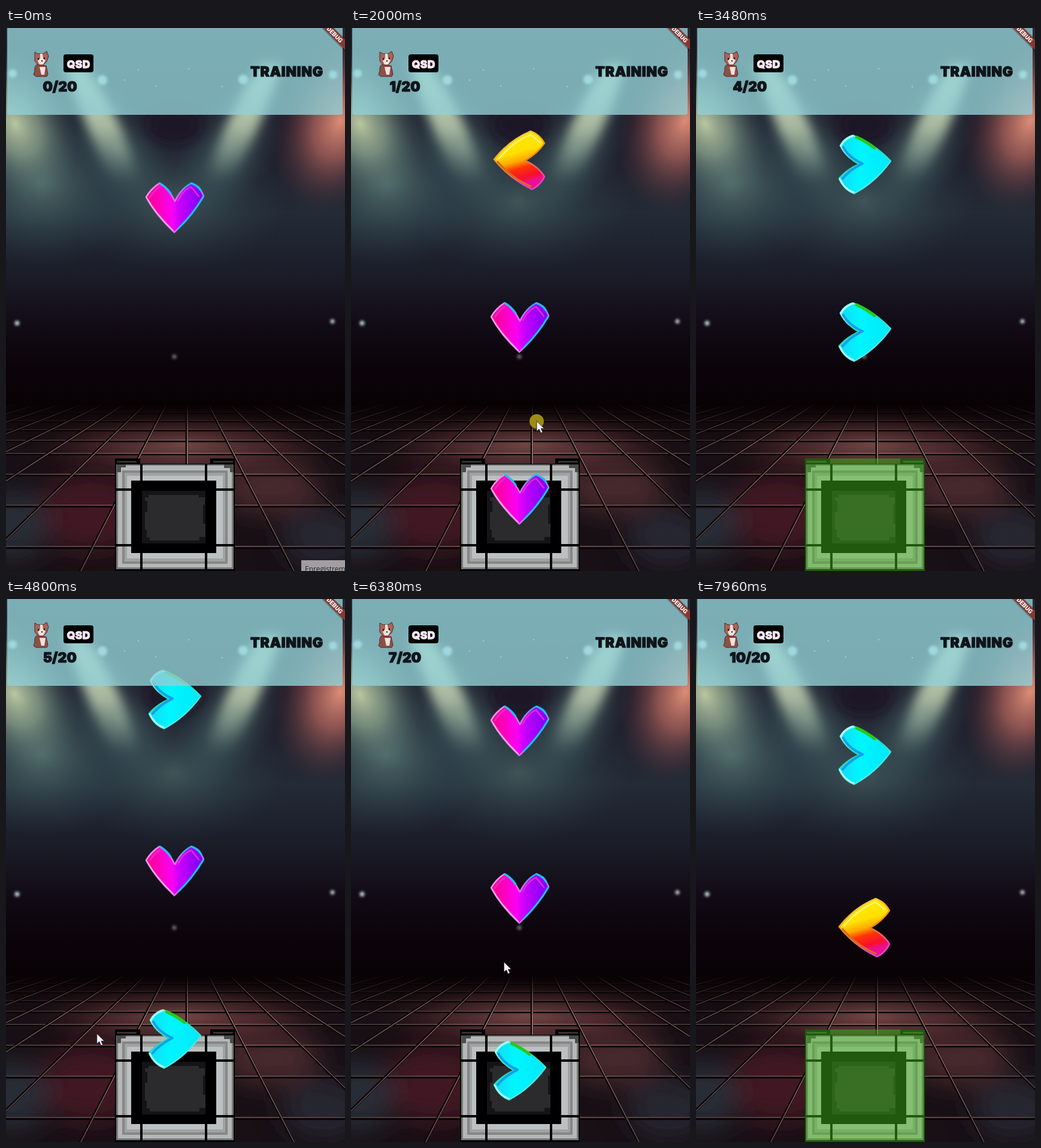
Write an HTML page that moves like this. It is 566 px wide and 907 px high and loops after 8 s.

```html
<!DOCTYPE html>
<html lang="en">
<head>
<meta charset="utf-8">
<title>Arrow training</title>
<style>
html, body { margin: 0; width: 100%; height: 100%; overflow: hidden; background: #080204; }
svg { position: absolute; left: 0; top: 0; width: 566px; height: 907px; }
#room { will-change: transform; }
.title { font: 900 23px Inter, "DejaVu Sans", sans-serif; fill: #10151a; stroke: #10151a; stroke-width: 1.2; stroke-linejoin: round; }
.wide { letter-spacing: .8px; }
.tag { font-size: 18px; fill: #fbe9f5; stroke: #fbe9f5; stroke-width: .8; }
.debug { font: 900 10.2px Roboto, sans-serif; fill: #fff; }
.hint { font: 12px "Open Sans", sans-serif; fill: #22262c; }
</style>
</head>
<body>
<svg id="room" viewBox="0 0 566 907">
  <defs>
    <linearGradient id="wall" x2="0" y2="1">
      <stop offset="0" stop-color="#282936"/><stop offset=".18" stop-color="#1f1b29"/>
      <stop offset=".34" stop-color="#232b36"/><stop offset=".45" stop-color="#1b1d29"/>
      <stop offset=".54" stop-color="#120c17"/><stop offset=".63" stop-color="#0b0309"/>
      <stop offset=".7" stop-color="#080204"/>
    </linearGradient>
    <linearGradient id="depth" x2="0" y2="1">
      <stop offset="0" stop-color="#080204"/><stop offset=".13" stop-color="#080204" stop-opacity=".35"/>
      <stop offset=".25" stop-color="#080204" stop-opacity="0"/>
    </linearGradient>
    <linearGradient id="ray" x2="0" y2="1">
      <stop offset=".2" stop-color="#c6d6b6"/><stop offset=".55" stop-color="#b3c3a8" stop-opacity=".9"/>
      <stop offset="1" stop-color="#7d988c" stop-opacity="0"/>
    </linearGradient>
    <radialGradient id="cream"><stop stop-color="#b9c6a0"/><stop offset=".4" stop-color="#8ba28c" stop-opacity=".75"/><stop offset="1" stop-color="#3d5a60" stop-opacity="0"/></radialGradient>
    <radialGradient id="teal"><stop stop-color="#587774" stop-opacity=".85"/><stop offset="1" stop-color="#2b4550" stop-opacity="0"/></radialGradient>
    <radialGradient id="coral"><stop stop-color="#dc8d76"/><stop offset=".4" stop-color="#a55f59" stop-opacity=".8"/><stop offset="1" stop-color="#4a2b36" stop-opacity="0"/></radialGradient>
    <radialGradient id="sheen"><stop stop-color="#8a5652" stop-opacity=".8"/><stop offset=".5" stop-color="#6a383a" stop-opacity=".55"/><stop offset="1" stop-color="#3a1a20" stop-opacity="0"/></radialGradient>
    <radialGradient id="edge" gradientUnits="userSpaceOnUse" cx="300" cy="695" r="320">
      <stop stop-color="#dba79b"/><stop offset=".5" stop-color="#a3746f"/><stop offset="1" stop-color="#665357"/>
    </radialGradient>
    <filter id="soft" x="-100%" y="-100%" width="300%" height="300%"><feGaussianBlur stdDeviation="22"/></filter>
    <filter id="beam" x="-100%" y="-100%" width="300%" height="300%"><feGaussianBlur stdDeviation="9"/></filter>
    <filter id="dot" x="-100%" y="-100%" width="300%" height="300%"><feGaussianBlur stdDeviation="2"/></filter>
  </defs>
  <rect width="566" height="907" fill="url(#wall)"/>
  <ellipse cx="60" cy="260" rx="170" ry="140" fill="url(#teal)"/>
  <ellipse cx="280" cy="290" rx="190" ry="120" fill="url(#teal)" opacity=".65"/>
  <ellipse cx="185" cy="200" rx="75" ry="135" fill="url(#teal)" transform="rotate(-32 185 200)"/>
  <ellipse cx="375" cy="200" rx="75" ry="135" fill="url(#teal)" transform="rotate(32 375 200)"/>
  <ellipse cx="15" cy="160" rx="95" ry="140" fill="url(#cream)" transform="rotate(-28 15 160)"/>
  <ellipse cx="558" cy="155" rx="105" ry="160" fill="url(#coral)" transform="rotate(20 558 155)"/>
  <g filter="url(#beam)" fill="url(#ray)">
    <path d="M96 60L130 60Q190 140 222 255L178 255Q130 160 96 60Z"/>
    <path d="M424 60L460 60Q430 160 374 255L334 255Q370 140 424 60Z"/>
  </g>
  <ellipse cx="281" cy="162" rx="42" ry="28" fill="#1d1726" filter="url(#beam)"/>
  <g filter="url(#dot)" fill="#d8ffff">
    <circle cx="11" cy="76" r="7"/><circle cx="161" cy="87" r="8"/>
    <circle cx="396" cy="86" r="8"/><circle cx="546" cy="78" r="7"/>
    <circle cx="18.500" cy="493" r="4" fill="#bcd0cf"/><circle cx="545" cy="490" r="3.500" fill="#c8d4d2"/>
    <circle cx="281" cy="549" r="3.500" fill="#747477"/>
  </g>
  <svg y="628" width="566" height="279" viewBox="0 628 566 279">
    <rect y="628" width="566" height="279" fill="#181015"/>
    <g filter="url(#soft)">
      <ellipse cx="140" cy="810" rx="90" ry="65" fill="#4e1c26" opacity=".8"/>
      <ellipse cx="440" cy="765" rx="85" ry="45" fill="#5a3035" opacity=".75"/>
      <ellipse cx="10" cy="830" rx="60" ry="60" fill="#2a3540" opacity=".8"/>
      <ellipse cx="530" cy="850" rx="70" ry="50" fill="#252530"/>
    </g>
    <ellipse cx="295" cy="695" rx="265" ry="75" fill="url(#sheen)"/>
    <g id="tiles"></g>
    <rect y="628" width="566" height="279" fill="url(#depth)"/>
  </svg>
</svg>

<svg viewBox="0 0 566 907">
  <defs>
    <linearGradient id="pink"><stop stop-color="#ff0089"/><stop offset=".45" stop-color="#fa00f4"/><stop offset=".58" stop-color="#c900fb"/><stop offset="1" stop-color="#7800f5"/></linearGradient>
    <linearGradient id="pinkRim"><stop stop-color="#f39be6"/><stop offset=".55" stop-color="#d070ee"/><stop offset=".75" stop-color="#12b6f2"/><stop offset="1" stop-color="#bd7cf0"/></linearGradient>
    <linearGradient id="gold" x2=".25" y2="1"><stop stop-color="#fff200"/><stop offset=".45" stop-color="#ffe000"/><stop offset=".6" stop-color="#ffa800"/><stop offset=".72" stop-color="#ff3406"/><stop offset=".88" stop-color="#f8102a"/><stop offset="1" stop-color="#e8109a"/></linearGradient>
    <linearGradient id="goldRim" x2=".35" y2="1"><stop stop-color="#ffe85c"/><stop offset=".6" stop-color="#e78913"/><stop offset="1" stop-color="#e646c2"/></linearGradient>
    <linearGradient id="aqua"><stop stop-color="#15d8f5"/><stop offset=".4" stop-color="#00f6ff"/><stop offset="1" stop-color="#00e7fa"/></linearGradient>
    <linearGradient id="aquaRim" x2=".6" y2="1"><stop stop-color="#a2fff3"/><stop offset=".5" stop-color="#20dcae"/><stop offset="1" stop-color="#63edfa"/></linearGradient>
    <g id="down" fill="none" stroke-linejoin="round" stroke-linecap="round">
      <path d="M2 32Q10 18 24 9Q40 18 50 39Q60 18 77 9Q92 15 98 30Q80 62 49 91Q18 62 2 32Z" fill="url(#pink)" stroke="url(#pinkRim)" stroke-width="2.500"/>
      <path d="M25 9Q36 15 43 26M78 9Q90 13 94 22M97 32Q80 61 56 84" stroke="#18bff4" stroke-width="3"/>
      <path d="M8 33Q14 22 25 15M55 38Q64 20 77 15L90 31" stroke="#e32ad0" stroke-width="2.500"/>
      <path d="M4 35Q20 62 47 88" stroke="#f2a4ec" stroke-width="2"/>
    </g>
    <g id="left" fill="none" stroke-linejoin="round" stroke-linecap="round">
      <path d="M7 49Q32 17 68 2Q84 8 91 22Q80 39 59 51Q82 62 91 78Q84 93 70 99Q31 80 7 49Z" fill="url(#gold)" stroke="url(#goldRim)" stroke-width="2.500"/>
      <path d="M15 48Q38 20 68 8L84 21" stroke="#fff49a" stroke-width="2"/>
      <path d="M13 53Q36 80 68 94" stroke="#d96a19" stroke-width="3"/>
    </g>
    <g id="right" fill="none" stroke-linejoin="round" stroke-linecap="round">
      <path d="M9 19Q16 6 30 2Q66 16 93 45Q68 80 32 99Q15 93 7 74Q18 60 40 50Q18 38 9 19Z" fill="url(#aqua)" stroke="url(#aquaRim)" stroke-width="2.500"/>
      <path d="M36 5Q52 12 66 23" stroke="#27c91a" stroke-width="5"/>
      <path d="M14 22Q23 39 46 49Q24 60 13 74" stroke="#159ef0" stroke-width="4"/>
      <path d="M8 75Q16 92 31 97M10 19Q17 7 30 3" stroke="#a9fff8" stroke-width="3"/>
    </g>
  </defs>

  <g shape-rendering="crispEdges">
    <path d="M182 719H224V728H341V719H382V907H182Z"/>
    <path d="M185 723H218V726H185ZM346 723H379V726H346Z" fill="#333"/>
    <rect x="184" y="729" width="196" height="175" fill="#777979"/>
    <rect x="187" y="731" width="190" height="170" fill="#b6b8b8"/>
    <rect x="194" y="739" width="176" height="156" fill="#858787"/>
    <rect x="198" y="743" width="168" height="148" fill="#a0a3a3"/>
    <rect x="202" y="748" width="160" height="138" fill="#bcc0c0"/>
    <path d="M185 729H200V734H192V742H185ZM364 729H380V742H374V735H364Z" fill="#4b4c4c"/>
    <path d="M209 756H351V877H209ZM224 728H228V907H224ZM332 728H336V907H332ZM182 769H382V773H182ZM182 862H382V866H182Z"/>
    <rect x="227" y="773" width="106" height="88" fill="#141416"/>
    <path d="M238 780H322V784H332V796H329V828H333V850H323V856H240V851H235V838H232V808H236V790H232V784H238Z" fill="#2b2a2c"/>
  </g>
  <rect id="flash" x="182" y="719" width="200" height="188" fill="#46be1e" opacity=".47"/>
  <g id="arrows"></g>

  <rect x="2" y="-6" width="560" height="151" rx="4" fill="#91d0d6" fill-opacity=".8"/>
  <g fill="#c5eeee" opacity=".7"><circle cx="198" cy="87" r="1"/><circle cx="221" cy="70" r="1"/><circle cx="250" cy="97" r="1"/><circle cx="305" cy="68" r="1"/><circle cx="361" cy="98" r="1"/></g>

  <g stroke="#4b2927" stroke-width="1">
    <path d="M52 61Q47 63 48 72L46 78L50 81H68L70 77L67 63Z" fill="#8d5046"/>
    <path d="M48 40L53 43H62L68 39L71 47L68 56L62 62H54L48 55Z" fill="#a9655a"/>
    <path d="M57 43H61L62 51L66 54L62 61H56L53 55L57 51ZM56 65H66L64 78H59Z" fill="#f1e1dc" stroke="none"/>
    <path d="M54 63H66" stroke="#a42838" stroke-width="2"/>
    <path d="M54 50V53M64 49V52M59 55H61" stroke="#241519" stroke-width="2"/>
  </g>
  <rect x="96" y="44" width="50" height="30" rx="4"/>
  <text class="title tag" x="121" y="67" text-anchor="middle">QSD</text>
  <text class="title" id="score" x="90" y="106" text-anchor="middle">0/20</text>
  <text class="title wide" x="530" y="81" text-anchor="end">TRAINING</text>

  <g transform="translate(549 11) rotate(45)">
    <rect x="-40" y="-7" width="80" height="15" fill="#000" opacity=".25"/>
    <rect x="-40" y="-6" width="80" height="12" fill="#883732"/>
    <text class="debug" y="3.700" text-anchor="middle">DEBUG</text>
  </g>

  <g id="hint">
    <rect x="493" y="889" width="80" height="20" fill="#a19da0"/>
    <text class="hint" x="499" y="908">Enregistrement</text>
  </g>
  <circle id="press" cx="310" cy="657" r="12" fill="#9d8b12"/>
  <path id="cursor" d="M0 0V17L4 13.500L7 20L10 18.500L7.200 12.500H12.500Z" fill="#f4f2f8" stroke="#15151c" stroke-width=".8"/>
</svg>

<script>
const LOOP = 8000, SPAWN_Y = 36, FLASH_MS = 500;
const byId = id => document.getElementById(id);
const show = (node, on) => node.style.display = on ? '' : 'none';

function add(parent, tag, attrs) {
  const node = document.createElementNS('http://www.w3.org/2000/svg', tag);
  for (const key in attrs) node.setAttribute(key, attrs[key]);
  return parent.appendChild(node);
}

// Floor joints: a dark groove with a lit edge, all meeting at one vanishing point.
function joint(d, width, shift) {
  const tiles = byId('tiles');
  add(tiles, 'path', { d, stroke: '#0a0507', 'stroke-width': width + 2, fill: 'none' });
  add(tiles, 'path', { d, stroke: 'url(#edge)', 'stroke-width': width * .6, fill: 'none', transform: shift, opacity: .85 });
}
[634, 643, 657, 672, 690, 712, 747, 799, 868].forEach((y, i) =>
  joint(`M0 ${y}H566`, .6 + i * .22, `translate(0 ${-.8 - i * .15})`));
for (let k = -9; k <= 9; k++) joint(`M${302 + k * 36} 630L${302 + k * 178} 907`, 2.6, 'translate(1 0)');

// Piecewise linear track of [time, ...values] rows.
function track(rows, t) {
  const i = Math.max(1, rows.findIndex(row => row[0] >= t));
  const a = rows[i - 1], b = rows[i], p = (t - a[0]) / (b[0] - a[0]);
  return a.slice(1).map((v, n) => v + (b[n + 1] - v) * p);
}

const scroll = [[0, 0], [820, 320], [2000, 767], [3480, 1337], [4800, 1844], [6380, 2464], [7960, 3075], [8001, 3091]];
const hits = [1270, 2040, 2480, 3420, 4150, 4980, 5690, 6440, 7250, 7700];
const arrows = [
  ['down', 250], ['down', -30], ['down', -317], ['left', -597], ['right', -880], ['right', -1160],
  ['down', -1440], ['right', -1727], ['down', -2014], ['down', -2294], ['left', -2577], ['right', -2865]
].map(([kind, start], i) => ({
  start, hit: hits[i] ?? Infinity, node: add(byId('arrows'), 'use', { href: '#' + kind })
}));

const cursorPaths = [
  [[600, 300, 900], [820, 287, 753], [1250, 300, 840], [1600, 290, 700], [2000, 310, 656], [2450, 305, 890]],
  [[3700, 2, 780], [4100, 100, 750], [4800, 151, 726], [5250, 460, 690], [5750, 300, 640],
   [6380, 255, 606], [6800, 380, 680], [7300, 290, 720], [7850, 268, 850]]
];

function draw(t) {
  const [distance] = track(scroll, t);
  for (const { start, hit, node } of arrows) {
    const y = start + distance;
    show(node, y >= SPAWN_Y && t < hit);
    node.setAttribute('transform', `translate(232 ${y})`);
  }
  const done = hits.filter(hit => hit <= t);
  byId('score').textContent = `${done.length}/20`;
  show(byId('flash'), done.length && t - done[done.length - 1] < FLASH_MS);
  show(byId('hint'), t < 400);
  show(byId('press'), t > 1940 && t < 2060);
  const path = cursorPaths.find(rows => t >= rows[0][0] && t <= rows[rows.length - 1][0]);
  show(byId('cursor'), path);
  if (path) byId('cursor').setAttribute('transform', `translate(${track(path, t)})`);
}

const began = performance.now();
function tick() {
  draw((performance.now() - began) % LOOP);
  requestAnimationFrame(tick);
}
tick();
</script>
</body>
</html>
```
